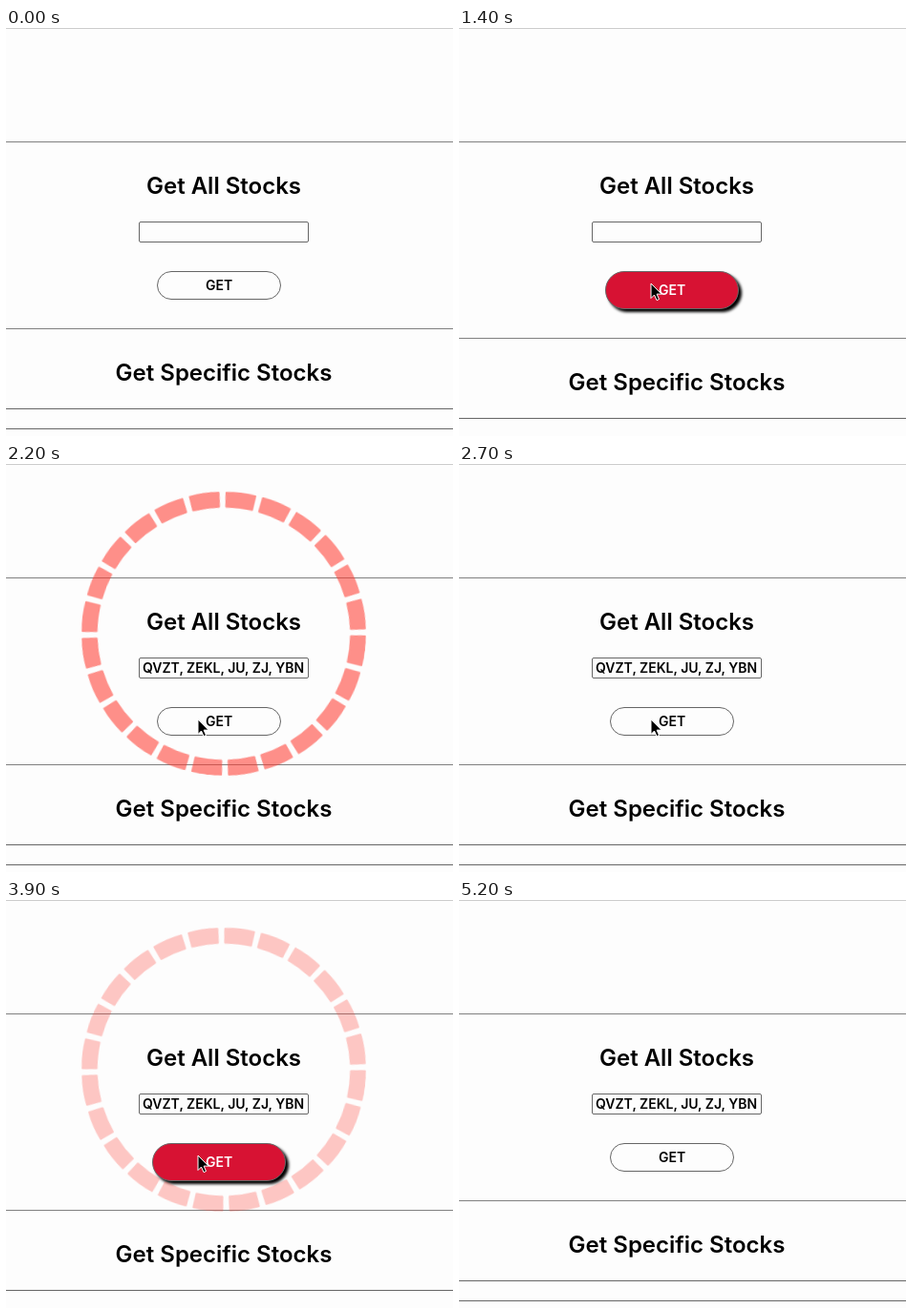
Recreate the animation shown at these times as an HTML page. Size 468 px wide and 428 px high, loop 7600 ms.

```html
<!DOCTYPE html>
<html lang="en">
<head>
<meta charset="utf-8">
<title>Get stocks</title>
<style>
  html, body { margin: 0; width: 100%; height: 100%; overflow: hidden; background: #fdfdfd; }
  svg { display: block; }
  text { font: 600 14px Inter, "Open Sans", sans-serif; }
  .title { font-size: 24px; text-anchor: middle; }
  .rule { stroke: #808080; }
  .box { fill: none; stroke: #666; }
</style>
</head>
<body>
<svg width="468" height="428" viewBox="0 0 468 428">
  <path stroke="#ccc" d="M0 .5H468"/>
  <path class="rule" d="M0 119.5H468"/>
  <text class="title" x="228" y="174">Get All Stocks</text>
  <rect class="box" x="139.5" y="203.5" width="177" height="21" rx="1.5"/>
  <text id="list" x="143" y="219">QVZT, ZEKL, JU, ZJ, YBN</text>
  <rect id="button" stroke="#666"/>
  <text id="label" x="209">GET</text>
  <g id="below">
    <path class="rule" d="M0 315.5H468"/>
    <text class="title" x="228" y="370">Get Specific Stocks</text>
    <rect class="box" x="-2" y="399.5" width="472" height="21"/>
  </g>
  <g id="ring" fill="#ff3b30" stroke="#ff3b30" stroke-width="2" stroke-linejoin="round"></g>
  <path id="cursor" d="M0 0V15.5L3.5 12L6 17.6L8.5 16.5L6.1 11.1H11Z" stroke="#fff"/>
</svg>
<script>
const LOOP = 7600, STEP = 100, DASHES = 24;
const $ = id => document.getElementById(id);
const set = (id, attrs) => {
  for (const k in attrs) $(id).setAttribute(k, attrs[k]);
};
const clamp = x => Math.min(1, Math.max(0, x));
const ease = x => x * x * (3 - 2 * x);
const mix = (a, b, k) => a + (b - a) * k;
const blend = (a, b, k) => `color-mix(in srgb, ${b} ${k * 100}%, ${a})`;
const shown = on => on ? "visible" : "hidden";

// Rises to 1 after start and is back at 0 at the end.
const pulse = (t, start, end, fade = 300) =>
  ease(clamp(Math.min(t - start, end - t) / fade));

// Each pointer move: start time, duration, destination.
const moves = [
  { at: 400, time: 200, x: 322, y: 161 },
  { at: 700, time: 400, x: 201, y: 268 },
  { at: 4700, time: 500, x: 150, y: 430 }
];

function pointer(t) {
  let x = 5, y = 408;
  for (const m of moves) {
    const k = clamp((t - m.at) / m.time);
    x = mix(x, m.x, k);
    y = mix(y, m.y, k);
  }
  return `translate(${x} ${y})`;
}

for (let i = 0; i < DASHES; i++) {
  $("ring").innerHTML += `<path transform="rotate(${i * 360 / DASHES})"
    d="M-15.2 -147Q0 -149 15.2 -147L13.6 -132.5Q0 -134 -13.6 -132.5Z"/>`;
}

function draw(t) {
  const h = pulse(t, 1100, 1800) + pulse(t, 3400, 5200);
  set("button", {
    x: 158.5 - 5 * h, y: 255.5, width: 129 + 10 * h, height: 29 + 10 * h, rx: 14.5 + 5 * h
  });
  $("button").style.fill = blend("#fdfdfd", "#d71233", h);
  $("button").style.filter = h ? `drop-shadow(${3 * h}px ${3 * h}px ${1.5 * h}px rgb(0 0 0 / ${h}))` : "none";
  $("label").style.fill = blend("#000", "#fff", h);
  set("label", { y: 275 + 5 * h });
  set("below", { transform: `translate(0 ${10 * h})` });
  set("list", { visibility: shown(t >= 2000) });

  const age = t - (t < 3000 ? 1600 : 3600);
  set("ring", {
    opacity: .57 * (pulse(t, 1500, 2500) + pulse(t, 3450, 4050)),
    transform: `translate(228 178) rotate(${6 + age / 600})`
  });
  set("cursor", { visibility: shown(t >= 400 && t < 5200), transform: pointer(t) });
}

const start = performance.now();
function tick() {
  const t = (performance.now() - start) % LOOP;
  draw(Math.floor(t / STEP) * STEP);
  requestAnimationFrame(tick);
}
tick();
</script>
</body>
</html>
```
